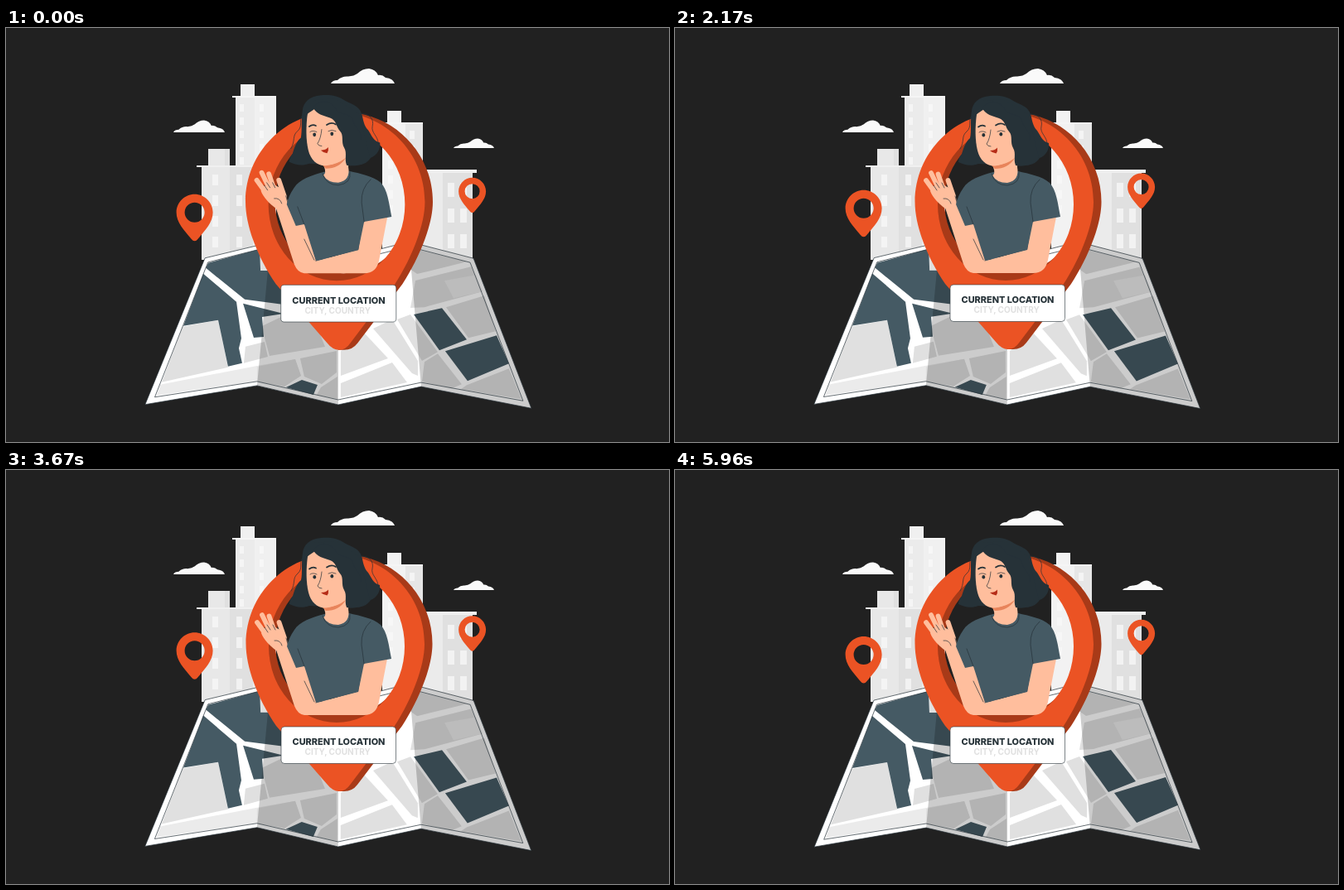
Animation of 800x500 px, one loop 6 s. Source, as an HTML page:

```html
<!DOCTYPE html>
<html lang="en">
<head>
<meta charset="utf-8">
<title>Current location</title>
<style>
  html, body { margin: 0; width: 100%; height: 100%; overflow: hidden; background: #212121; }
  svg { display: block; width: 800px; height: 500px; }
  text { font-family: Inter, Roboto, sans-serif; text-anchor: middle; }
  .slate { fill: #455a64; }
  .dark { fill: #263238; }
  .skin { fill: #ffbe9d; }
  .orange { fill: #eb5324; }
  .line { fill: none; stroke: #263238; stroke-width: .7; stroke-linecap: round; stroke-linejoin: round; }
  .bold { stroke-width: 1.7; }
</style>
</head>
<body>
<svg viewBox="0 0 800 500">
  <defs>
    <path id="cloud" d="M0 18Q2 14 8 14Q13 9 21 9.500Q28 9 32 6Q38 0 46 0Q54 1 57 8Q62 7 66 11Q75 12 77 18Z"/>
    <path id="marker" fill-rule="evenodd" d="M0-22C12-22 22-12 22 0C22 12 13 21 4 32Q0 37-4 32C-13 21-22 12-22 0C-22-12-12-22 0-22ZM0-12A12 12 0 1 0 0 12A12 12 0 1 0 0-12Z"/>
  </defs>

  <g id="city">
    <path fill="#ebebeb" d="M277 82h49v200h-49z"/>
    <path fill="#f0f0f0" d="M300 82h26v200h-26zM283 68h17v14h-17z"/>
    <path fill="#f5f5f5" d="M273 82h53v2h-53z"/>
    <path fill="#e0e0e0" d="M236 167h62v113h-62zM249 146h21v21h-21z"/>
    <path fill="#e8e8e8" d="M236 167h34v113h-34zM244 146h20v21h-20z"/>
    <path fill="#f0f0f0" d="M230 166h68v2h-68z"/>
    <path fill="#f2f2f2" d="M454 114h49v160h-49zM460 100h17v14h-17z"/>
    <path fill="#e6e6e6" d="M482 114h21v160h-21z"/>
    <path fill="#f5f5f5" d="M454 114h49v2h-49z"/>
    <path fill="#ebebeb" d="M503 173h60v105h-60z"/>
    <path fill="#e0e0e0" d="M527 175h36v103h-36z"/>
    <path fill="#f0f0f0" d="M503 171h65v4h-65z"/>
    <g id="windows" fill="#fafafa" opacity=".7"></g>
  </g>

  <g fill="#fafafa">
    <use href="#cloud" x="392" y="49"/>
    <use href="#cloud" transform="translate(202 111.5) scale(.805)"/>
    <use href="#cloud" transform="translate(540 133.5) scale(.636)"/>
  </g>

  <g id="map">
    <path fill="#fff" stroke="#263238" stroke-width=".7" d="M240 278L319 259L401 280L486 258L564 278L634 459L501 433L401 455L303 432L168 455Z"/>
    <g fill="#e0e0e0">
      <path d="M213 361L256 353L268 410L188 428Z"/>
      <path d="M306 267L317 264L334 270V293H307Z"/>
      <path d="M289 385L312 379L316 397L287 405Z"/>
      <path d="M309 360L340 345L372 352L385 385L318 396L312 374Z"/>
      <path fill="#ebebeb" d="M186 431L303 408L349 400L356 420L336 433L302 427L182 444Z"/>
      <path d="M303 409L349 400L356 420L336 433L303 427Z"/>
      <path d="M355 399L399 390V416L381 430L360 421Z"/>
      <path d="M380 434L400 421V448L375 443Z"/>
      <path d="M404 390L432 368L461 399L404 420Z"/>
      <path d="M404 429L466 404L484 428L404 446Z"/>
      <path d="M443 363L466 352L497 402V420L490 417Z"/>
      <path d="M472 352L488 346L521 391L502 402Z"/>
      <path d="M490 266L556 282L496 297L486 290Z"/>
      <path d="M494 305L561 288L575 318L505 337L488 338Z"/>
      <path fill="#ebebeb" d="M529 305L567 298L575 318L540 326Z"/>
      <path d="M531 337L577 323L591 366L558 374Z"/>
      <path d="M505 403L521 393L550 430L538 435L502 427Z"/>
      <path d="M556 431L607 411L622 448L549 436Z"/>
    </g>
    <g class="slate">
      <path d="M244 284L306 267L307 293H335V334L288 328L241 290Z"/>
      <path d="M238 297L278 331L284 375L281 387L285 405L268 409L256 353L214 360Z"/>
      <path d="M286 333L335 345L309 349L311 373L299 374Z"/>
      <path d="M338 434L357 425L376 431L371 443Z"/>
      <path d="M492 346L526 338L556 376L523 389Z"/>
      <path d="M530 390L592 371L607 405L557 426Z"/>
    </g>
    <path opacity=".2" d="M319 259L401 280V455L303 432ZM486 258L564 278L634 459L501 433Z"/>
    <path class="line" stroke-width=".6" d="M244 283L319 264L401 285L486 264L560 283L624 450L501 428L401 449L303 427L180 446Z"/>
  </g>

  <g class="orange">
    <g id="pinA"><use href="#marker" x="227.6" y="223"/></g>
    <g id="pinB"><use href="#marker" transform="translate(562.6 197.4) scale(.75)"/></g>
  </g>

  <g id="hero">
    <path fill="#a83a18" fill-rule="evenodd" d="M407 102C466 102 514.5 150 514.5 210C514.5 240 496 281 478 309L424 380Q418 388 408 388H401L336 310C313 280 299 250 299 210C299 150 347 102 407 102ZM407 124A82 86 0 1 0 407 296A82 86 0 1 0 407 124Z"/>
    <path class="orange" fill-rule="evenodd" d="M397 102C457 102 505 150 505 210C505 240 487 281 469 309L416 379Q410 388 402 388Q394 388 387 379L326 309C306 280 289.500 241 289.500 210C289.500 150 338 102 397 102ZM399 121A82 92 0 1 0 399 305A82 92 0 1 0 399 121Z"/>

    <!-- back hair -->
    <path class="dark" d="M380 82C366 83 359 91 358 100C356 112 358 124 356 133C350 138 348 146 346 152Q342 157 342 162C350 166 358 167 366 164L412 166C426 167 435 165 440 157C448 154 452 146 451 139C443 137 441 130 437 124C431 118 431 110 429 104C426 95 418 93 410 89C400 82 390 81 380 82Z"/>

    <!-- arms -->
    <path class="skin" d="M325 214L340 208L352 236L364 232L376 281L425 267L431 232L460 228L450 280Q447 296 432 296L360 296Q352 295 348 285Z"/>
    <path class="line" stroke="#d97f5c" d="M374 281L425 267M372 280L360 255"/>

    <!-- hand -->
    <path class="skin" d="M308 197C310 190 318 187 325 190L334 195C339 202 341 209 339 214L326 218C318 212 311 205 308 197Z"/>
    <g fill="none" stroke="#ffbe9d" stroke-width="5.800" stroke-linecap="round">
      <path d="M303 184L316 202M309 175L320 198M317.500 176.500L325 198M329.500 184L336 203"/>
    </g>
    <path class="line" stroke="#a8502f" d="M312 190L316 196M315 187L319 193M322 187L325 193M324 206Q331 205 333 212M338 203L341 214"/>

    <!-- neck and shirt -->
    <path class="slate" d="M384 174C369 178 354 183 348 193Q341 203 339 213L350 239L360 237L374 281L425 268L432 234L465 228C462 212 460 195 452 187C443 179 427 176 414 173Z"/>
    <path class="skin" d="M383 160L414 150L413 168Q416 184 401 187Q388 187 383 178Q387 176 384 168Z"/>
    <path fill="#e8845b" d="M381 165Q396 168 410 157Q402 170 386 170Z"/>
    <path class="line" d="M352 216L360 237M432 234L429 211Q428 194 440 183M382 176Q386 190 401 190Q417 188 415 174"/>

    <!-- face -->
    <path class="skin" d="M364 104C362 120 362 136 365 148C368 160 376 167 386 166.500C398 165 409 159 411 148L409 110L376 96Z"/>
    <ellipse class="dark" cx="372.300" cy="129.300" rx="1.900" ry="2.300"/>
    <ellipse class="dark" cx="393.300" cy="128.300" rx="1.900" ry="2.300"/>
    <path class="line bold" d="M366 119.500Q370 116.500 374 118.500M387 117.500Q393 113.500 398 117"/>
    <path class="line" d="M367 126Q370 123.500 375 126M389 125Q393 122.500 398 125M381 123Q380 134 376 140Q377 143 381 143"/>
    <path fill="#b52c17" d="M380 148Q386 148 389 144.500Q389.500 149 387.500 151.500Q383 151 380 148Z"/>

    <!-- front hair -->
    <path class="dark" d="M362 112C362 104 367 101 371 97C375 105 383 106 391 109C399 112 398 119 403 125C408 130 404 138 408 145C412 152 408 158 411 166C424 168 436 164 439 156L426 104L396 86L372 88L360 99Z"/>
    <path class="line" stroke="#546e7a" d="M371 96C383 83 394 91 399 100C405 107 416 102 419 113C421 122 430 125 428 135"/>
    <path class="line" stroke-width="1" d="M358 106C353 111 359 119 352 125C345 131 350 136 344 146M429 104C439 104 444 111 442 119C440 127 449 131 449 140"/>

    <!-- label -->
    <rect x="332" y="310" width="138.500" height="44.500" rx="4" fill="#fff" stroke="#263238" stroke-width=".6"/>
    <text x="401.500" y="332.300" font-size="10.900" font-weight="800" fill="#263238">CURRENT LOCATION</text>
    <text x="400.200" y="344.300" font-size="10" font-weight="700" fill="#e0e0e0">CITY, COUNTRY</text>
  </g>
</svg>
<script>
const $ = id => document.getElementById(id);

// x, y, columns, rows, column step, row step, width, height
const windowGrids = [
  [282, 92, 2, 5, 24, 16, 5, 9],
  [249, 177, 2, 4, 29, 25, 7, 13],
  [461, 124, 2, 6, 26, 18, 6, 10],
  [533, 187, 2, 3, 15, 31, 8, 17]
];
let panes = '';
for (const [x, y, cols, rows, dx, dy, w, h] of windowGrids)
  for (let c = 0; c < cols; c++)
    for (let r = 0; r < rows; r++)
      panes += `<rect x="${x + c * dx}" y="${y + r * dy}" width="${w}" height="${h}"/>`;
$('windows').innerHTML = panes;

// Linear interpolation through [time, value] keys
function track(t, keys) {
  const i = keys.findIndex(k => k[0] > t);
  const [t0, v0] = keys[i - 1], [t1, v1] = keys[i];
  return v0 + (v1 - v0) * (t - t0) / (t1 - t0);
}
const beat = [[0, 1], [600, 1.1], [1800, 1], [2400, 1], [3000, 1.1], [3600, 1], [6000, 1]];
const sway = [[0, 0], [375, 1], [1125, -1], [1500, 0]];
const float = [[0, 0], [1500, -10], [3000, 0]];
const lead = 25;

function draw(now) {
  const t = (now + lead) % 6000;
  const s = track(t, beat);
  const lift = `translate(0 ${track(t % 3000, float)})`;
  $('hero').setAttribute('transform', `translate(402 234.5) scale(${s}) translate(-402 -234.5)`);
  $('map').setAttribute('transform', `rotate(${track(t % 1500, sway)} 401 358)`);
  $('pinA').setAttribute('transform', lift);
  $('pinB').setAttribute('transform', lift);
}
const start = performance.now();
function tick() {
  draw(performance.now() - start);
  requestAnimationFrame(tick);
}
tick();
</script>
</body>
</html>
```
